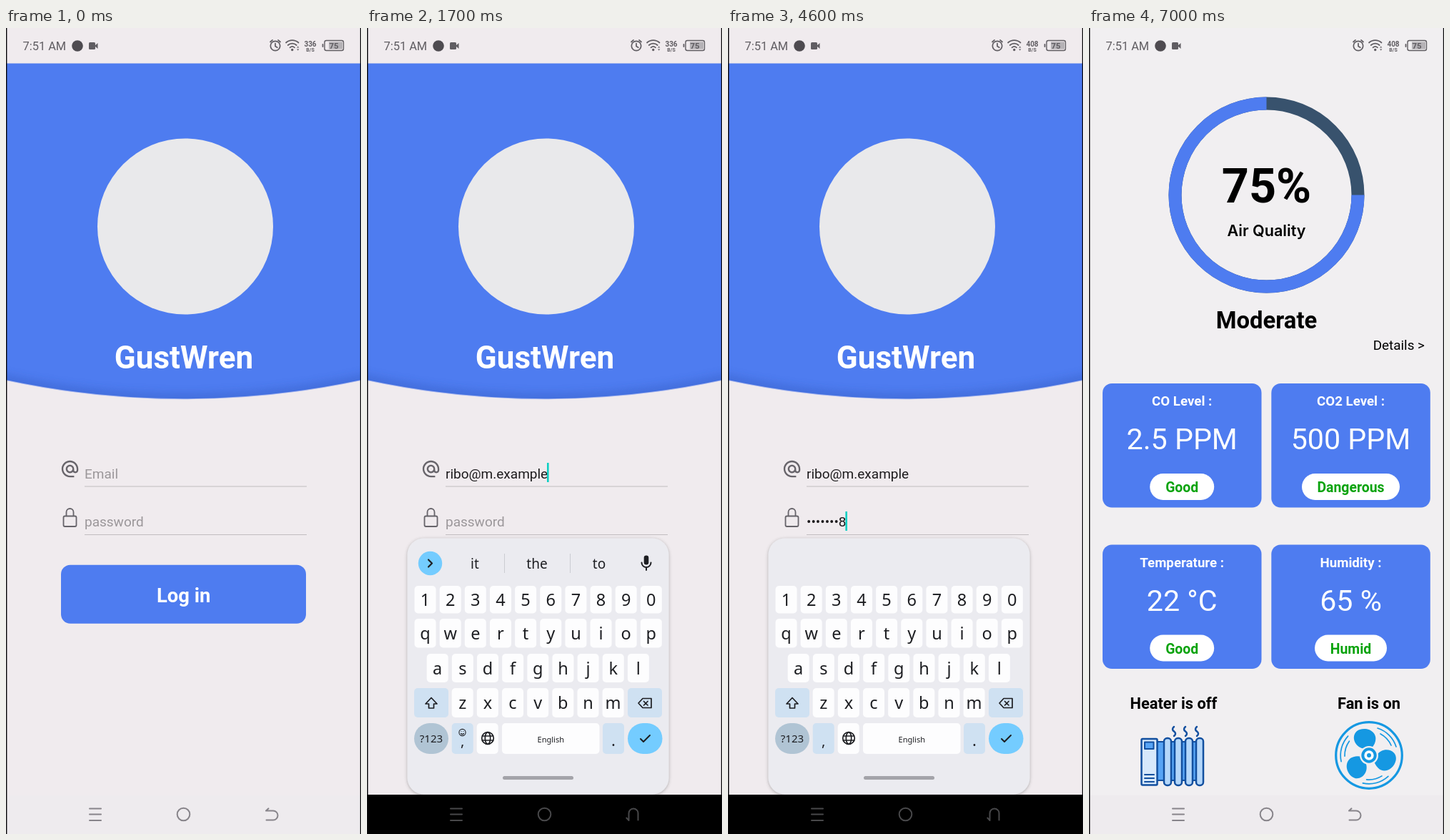
Animation of 497 by 1127 pixels, one loop 7.1 s. Source, as an HTML page:

```html
<!DOCTYPE html>
<html lang="en">
<head>
<meta charset="utf-8">
<title>Air quality app</title>
<style>
html, body { margin: 0; width: 100%; height: 100%; overflow: hidden; background: #f0ebee; }
svg { display: block; width: 497px; height: 1127px; font-family: Roboto, sans-serif; }
text { white-space: pre; }
.mid { text-anchor: middle; }
.bold { font-weight: 700; }
.line { fill: none; stroke: currentColor; stroke-linecap: round; stroke-linejoin: round; }
.field { font-size: 19px; fill: #1d1b1d; }
.hint { fill: #9b979a; }
.composing { text-decoration: underline; }
.key { font: 23.5px "Noto Sans", sans-serif; fill: #1d1e22; }
.strip { font: 19px "Noto Sans", sans-serif; fill: #1d1e22; }

#keyboard, #navDark, #nav, #turn, .press, #dash, #content, #heater, #fan {
  animation: 7.1s linear infinite both;
}
#keyboard { animation-name: keyboard; }
#navDark { animation-name: navDark; }
#nav { animation-name: navColor; }
#turn { animation-name: turn; transform-origin: 372px 1100px; }
.press { animation-name: press; }
#dash { animation-name: appear; }
#content { animation-name: grow; transform-origin: 248.5px 563px; }
#heater { animation-name: heater; }
#fan { animation-name: fan; }

@keyframes keyboard {
  0%, 4.2% { transform: translateY(370px); animation-timing-function: cubic-bezier(0, 0, .2, 1); }
  8.5%, 70.4% { transform: none; animation-timing-function: cubic-bezier(.4, 0, 1, 1); }
  74%, 100% { transform: translateY(370px); }
}
@keyframes navDark {
  0%, 4.2% { opacity: 0; }
  5.6%, 71.8% { opacity: 1; }
  74%, 100% { opacity: 0; }
}
@keyframes navColor {
  0%, 4.2% { color: #87848a; }
  5.6%, 71.8% { color: #48484a; }
  74%, 93.5% { color: #626065; }
  95%, 100% { color: #87848a; }
}
@keyframes turn {
  0%, 4.2% { transform: none; }
  7%, 71.8% { transform: rotate(-90deg); }
  74%, 100% { transform: none; }
}
@keyframes press {
  0%, 77.5% { opacity: 1; }
  79.2%, 81% { opacity: .2; }
  83.5%, 100% { opacity: 1; }
}
@keyframes appear {
  0%, 82.4% { opacity: 0; }
  84.4%, 100% { opacity: 1; }
}
@keyframes grow {
  0%, 82.4% { transform: scale(.85); animation-timing-function: cubic-bezier(.1, .6, .3, 1); }
  85.915% { transform: scale(.9913); animation-timing-function: ease-out; }
  89.5%, 100% { transform: none; }
}
@keyframes heater {
  0%, 83.9% { opacity: 0; }
  87%, 100% { opacity: 1; }
}
@keyframes fan {
  0%, 85.4% { opacity: 0; }
  89.6%, 100% { opacity: 1; }
}
</style>
</head>
<body>
<svg viewBox="0 0 497 1127">
  <defs>
    <clipPath id="headClip"><path d="M0 49.5H497V492A1191 1191 0 0 1 0 492Z"/></clipPath>
    <filter id="soft" x="-10%" y="-60%" width="120%" height="220%"><feGaussianBlur stdDeviation="7"/></filter>
    <filter id="shade" x="-10%" y="-10%" width="120%" height="120%">
      <feDropShadow dx="0" dy="1" stdDeviation="2" flood-color="#555" flood-opacity=".45"/>
    </filter>
  </defs>
  <rect width="497" height="1127" fill="#f0ebee"/>

  <!-- Login screen -->
  <path d="M497 492A1191 1191 0 0 1 0 492" fill="none" stroke="#a9b8ee" stroke-width="2"/>
  <g clip-path="url(#headClip)">
    <rect y="49" width="497" height="475" fill="#4e7cf0"/>
    <path d="M-20 488A1191 1191 0 0 0 517 488" fill="none" stroke="#2f55b8" stroke-width="9" opacity=".6" filter="url(#soft)"/>
  </g>
  <circle cx="251" cy="277.5" r="123" fill="#e9e9eb"/>
  <text class="mid bold" x="249" y="476" font-size="44" fill="#fff">GustWren</text>
  <path transform="translate(75.5 602.5) scale(1.17)" fill="#67646a" d="M12 2C6.48 2 2 6.48 2 12s4.48 10 10 10h5v-2h-5c-4.34 0-8-3.66-8-8s3.66-8 8-8 8 3.66 8 8v1.43c0 .79-.71 1.57-1.5 1.57s-1.5-.78-1.5-1.57V12c0-2.76-2.24-5-5-5s-5 2.24-5 5 2.24 5 5 5c1.38 0 2.64-.56 3.54-1.47.65.89 1.77 1.47 2.96 1.47 1.97 0 3.5-1.6 3.5-3.57V12c0-5.52-4.48-10-10-10zm0 13c-1.66 0-3-1.34-3-3s1.34-3 3-3 3 1.34 3 3-1.34 3-3 3z"/>
  <g class="line" color="#67646a" stroke-width="1.8">
    <rect x="80.5" y="682.5" width="18" height="14.5" rx="2"/>
    <path d="M84.5 682V677a5 5 0 0 1 10 0V682"/>
  </g>
  <path d="M110 641H421M110 708.5H421" stroke="#c1bdc0" stroke-width="1.2"/>
  <text id="email" class="field" x="110" y="629.5"></text>
  <text id="password" class="field" x="110" y="697"></text>
  <rect id="caret" width="2.6" height="27" fill="#0ccfc2"/>
  <rect class="press" x="77" y="750.7" width="343" height="82" rx="13" fill="#4e7cf0"/>
  <text class="press mid bold" x="248.7" y="802.5" font-size="27.4" fill="#fff">Log in</text>

  <!-- Keyboard -->
  <g id="keyboard" color="#1d1e22">
    <rect x="56.5" y="713.5" width="366" height="358" rx="23" fill="#ebebf0" filter="url(#shade)"/>
    <g id="strip">
      <circle cx="88.5" cy="748.5" r="16.7" fill="#74ccff"/>
      <path class="line" d="M86 743.5l5 5-5 5" stroke-width="2.2"/>
      <path d="M192.5 735V762M284.5 735V762" stroke="#cbccd2"/>
      <text id="word0" class="strip mid" x="151" y="756"></text>
      <text id="word1" class="strip mid" x="238" y="756"></text>
      <text id="word2" class="strip mid" x="325" y="756"></text>
      <text id="name" class="strip mid" x="238" y="742.5" style="font-size:16px;font-weight:600">ribo</text>
      <text id="domain" class="strip mid" x="238" y="763" style="font-size:13.5px">@m.example</text>
      <rect x="387.7" y="737.5" width="6.6" height="13" rx="3.3" fill="currentColor"/>
      <path class="line" d="M384.5 747.5a6.5 6.5 0 0 0 13 0M391 754.5V758" stroke-width="2"/>
    </g>
    <g id="keys"></g>
    <g class="line" stroke-width="1.7">
      <path d="M90 936.5l8 8.5h-4.5v6h-7v-6H82Z"/>
      <path d="M386 937.5h12v13h-12l-6-6.5ZM387.5 941.5l5.5 5.5M393 941.5l-5.5 5.5"/>
      <path d="M383 994l4 4 9-9" stroke-width="2"/>
      <circle cx="169" cy="993" r="8.3"/>
      <ellipse cx="169" cy="993" rx="3.7" ry="8.3"/>
      <path d="M161.500 990h15M161.500 996h15"/>
      <g id="smile" stroke-width="1.1">
        <circle cx="133.5" cy="985" r="4.6"/>
        <path d="M131.5 986.5q2 2 4 0M132 983.5v.1M135 983.5v.1"/>
      </g>
    </g>
    <rect x="190" y="1046" width="99" height="5" rx="2.5" fill="#a3a3a9"/>
  </g>

  <!-- Dashboard -->
  <g id="dash">
    <rect width="497" height="1127" fill="#f1eff1"/>
    <g id="content">
      <g fill="none" stroke-width="18">
        <circle cx="248.5" cy="233.5" r="128" stroke="#38526d"/>
        <circle id="arc" cx="248.5" cy="233.5" r="128" stroke="#4e7cf0" pathLength="100"/>
      </g>
      <text id="percent" class="mid bold" x="248.5" y="243.5" font-size="66.5"></text>
      <text class="mid" x="248.5" y="291" style="font:600 21.6px Inter, sans-serif">Air Quality</text>
      <text class="mid bold" x="248.5" y="420" font-size="32.8">Moderate</text>
      <text x="470" y="450" font-size="18.9" text-anchor="end">Details &gt;</text>
      <g id="cards"></g>
      <text class="mid bold" x="118.5" y="952" font-size="21.8">Heater is off</text>
      <text class="mid bold" x="392" y="952" font-size="21.8">Fan is on</text>
      <g id="heater" class="line" color="#124f9f" stroke-width="2.5">
        <rect x="94" y="998" width="66" height="54" fill="#57a4f5" stroke="none"/>
        <path d="M96 998H160M96 1052H160" stroke-width="2"/>
        <rect x="73.5" y="994" width="22" height="64.5" rx="1.5" fill="#d6e8fb"/>
        <rect x="78" y="998.5" width="12.5" height="9.5" fill="#57a4f5" stroke-width="2"/>
        <path d="M78 1044h13M78 1049h13M78 1054h13" stroke-width="2"/>
        <g id="fins" fill="#b4d7fa"></g>
      </g>
      <g id="fan" color="#1598e2" transform="translate(392 1017)">
        <circle class="line" r="46.3" stroke-width="3.2"/>
        <g id="blades"></g>
        <circle r="13" fill="#f1eff1"/>
        <circle r="8.7" fill="#fff" stroke="currentColor" stroke-width="4"/>
        <circle r="3" fill="currentColor"/>
      </g>
    </g>
  </g>

  <!-- System bars -->
  <g color="#605d62" fill="#605d62">
    <text x="23.5" y="31" font-size="16.4">7:51 AM</text>
    <circle cx="100" cy="25" r="7.8" fill="#4e4b50"/>
    <rect x="116" y="20" width="9" height="10" rx="1.5"/>
    <path d="M124 25l4.5-4v8Z"/>
    <g class="line" stroke-width="1.7">
      <circle cx="377" cy="25" r="6.7"/>
      <path d="M377 21.5V25.5l2.8 1.8M370 19.5l3-2.7M384 19.5l-3-2.7"/>
      <path d="M392 20.5a13 13 0 0 1 17.5 0M394.7 24a9 9 0 0 1 12 0M397.5 27.3a5 5 0 0 1 6.5 0"/>
      <rect x="446" y="17.5" width="26.5" height="14" rx="2.5" stroke-width="1.4"/>
      <path d="M443.5 23V26" stroke-width="1.8"/>
    </g>
    <circle cx="400.7" cy="30.5" r="1.7"/>
    <path d="M407 27.5l1.7-2 1.7 2ZM407 29.5l1.7 2 1.7-2Z"/>
    <rect x="452" y="19.5" width="19" height="10" fill="#b5b2b6"/>
    <text class="mid bold" x="459" y="29" font-size="11.5">75</text>
    <text id="speed" class="mid bold" x="426" y="25.5" font-size="10"></text>
    <text id="unit" class="mid bold" x="426" y="33" font-size="7"></text>
  </g>
  <rect y="1073" width="497" height="54" fill="#eeebee"/>
  <rect id="navDark" y="1072" width="497" height="55" fill="#000"/>
  <g id="nav" class="line" stroke-width="2">
    <path d="M117 1091.5h16M117 1099.5h16M117 1108h16"/>
    <circle cx="248.5" cy="1099.5" r="8.8"/>
    <path id="turn" d="M367.5 1091.3l-3.500 3.200H374a6.500 6.500 0 0 1 0 13H364.500"/>
  </g>
  <path d="M.7 0V1127M496.5 0V1127" stroke="#09090b" stroke-width="1.4"/>
</svg>

<script>
const LOOP = 7100;
const EMAIL = "ribo@m.example";
const $ = id => document.getElementById(id);
const clamp = (v, lo, hi) => Math.min(hi, Math.max(lo, v));
const show = (id, on) => { $(id).style.visibility = on ? "visible" : "hidden"; };
const setText = (id, text) => { if ($(id).textContent !== text) $(id).textContent = text; };

function buildKeys() {
  const white = "#fdfdfe", tint = "#cfe1f2";
  const key = (x, y, w, h, label = "", fill = white, rx = 5, size = 23.5, drop = 8.5) =>
    `<rect x="${x}" y="${y}" width="${w}" height="${h}" rx="${rx}" fill="${fill}"/>` +
    `<text class="key mid" x="${x + w / 2}" y="${y + h / 2 + drop}" style="font-size:${size}px">${label}</text>`;
  const row = (chars, x, y, h) =>
    [...chars].map((c, i) => key(x + i * 35.15, y, 30, h, c)).join("");
  $("keys").innerHTML =
    row("1234567890", 66.5, 780, 38.5) +
    row("qwertyuiop", 66.5, 826, 40.5) +
    row("asdfghjkl", 83.7, 875, 40) +
    row("zxcvbnm", 118.7, 923, 41) +
    key(66, 923, 48, 41, "", tint) +
    key(365, 923, 48, 41, "", tint) +
    key(66, 972, 48, 43, '<tspan font-weight="500">?123</tspan>', "#b0c4d4", 21.5, 15, 5.5) +
    key(118.7, 972, 30, 43, ",", tint, 5, 20, 10) +
    key(153.7, 972, 30, 43) +
    key(189, 972, 136.5, 43, "English", white, 5, 11, 5) +
    key(330, 972, 30, 43, ".", tint, 5, 22, 10) +
    key(365, 972, 48.5, 43, "", "#74ccff", 21.5);
}

function buildDashboard() {
  const card = (x, y, title, value, state, pill) => `
    <g transform="translate(${x} ${y})" class="mid" fill="#fff">
      <rect width="222.5" height="173.5" rx="13" fill="#4e7cf0"/>
      <text class="bold" x="111.2" y="31" font-size="18.7">${title} :</text>
      <text x="111.2" y="92" font-size="41.2">${value}</text>
      <rect x="${111.2 - pill / 2}" y="126" width="${pill}" height="37" rx="18.5"/>
      <text class="bold" x="111.2" y="152" font-size="19.4" fill="#0aa30d">${state}</text>
    </g>`;
  $("cards").innerHTML =
    card(19, 497, "CO Level", "2.5 PPM", "Good", 90) +
    card(255.3, 497, "CO2 Level", "500 PPM", "Dangerous", 137) +
    card(19, 722.5, "Temperature", "22 °C", "Good", 90) +
    card(255.3, 722.5, "Humidity", "65 %", "Humid", 101);

  $("fins").innerHTML =
    [105, 120, 135, 150].map(x => `<rect x="${x}" y="993" width="10" height="66" rx="4.5"/>`).join("") +
    [119, 135, 151].map(x => `<path d="M${x} 977q-4 3.5 0 6.5t0 6.5" fill="none"/>`).join("");

  $("blades").innerHTML = [0, 120, 240].map(a => `
    <g transform="rotate(${a})">
      <path d="M-5-9C-22-10-27-31-13-36C0-40 12-31 9-20C8-15 5-12 3-9Z" fill="currentColor"/>
      <path class="line" d="M12-38A40 40 0 0 1 38-12M16-30A34 34 0 0 1 31-14" stroke-width="1.7"/>
    </g>`).join("");
}

function emailAt(t) {
  return t < 800 ? "" : t < 950 ? "r" : t < 1400 ? "ri" : EMAIL;
}

function passwordAt(t) {
  const n = clamp(Math.floor((t - 2900) / 220) + 1, 0, 8);
  if (!n) return "";
  return t < 5440 ? "•".repeat(n - 1) + n : "•".repeat(n);
}

function field(id, value, hint) {
  setText(id, value || hint);
  $(id).classList.toggle("hint", !value);
  return value ? $(id).getComputedTextLength() : 0;
}

function render(t) {
  const email = emailAt(t);
  const composing = email !== "" && email !== EMAIL;
  const onPassword = t >= 2700;
  const emailWidth = field("email", email, "Email");
  const passWidth = field("password", passwordAt(t), "password");
  $("email").classList.toggle("composing", composing);
  $("caret").setAttribute("x", 108.8 + (onPassword ? passWidth : emailWidth));
  $("caret").setAttribute("y", onPassword ? 676 : 608);
  show("caret", t >= 200);

  $("strip").style.display = $("smile").style.display = onPassword ? "none" : "";
  const words = composing ? [email, "", "rib"] : ["it", "the", "to"];
  words.forEach((word, i) => setText("word" + i, word));
  show("name", composing);
  show("domain", composing);

  const slow = t < 1900 ? "336" : "408";
  const fast = t >= 1900 && t < 4300;
  setText("speed", fast ? "11.7" : slow);
  setText("unit", fast ? "K/S" : "B/S");

  const level = clamp((t - 5895) / 8.45, 0, 75);
  $("arc").setAttribute("stroke-dasharray", `${level} 200`);
  setText("percent", Math.floor(level) + "%");
}

buildKeys();
buildDashboard();
render(0);
let start;
function tick(now) {
  start ??= now;
  render((now - start) % LOOP);
  requestAnimationFrame(tick);
}
requestAnimationFrame(tick);
</script>
</body>
</html>
```
